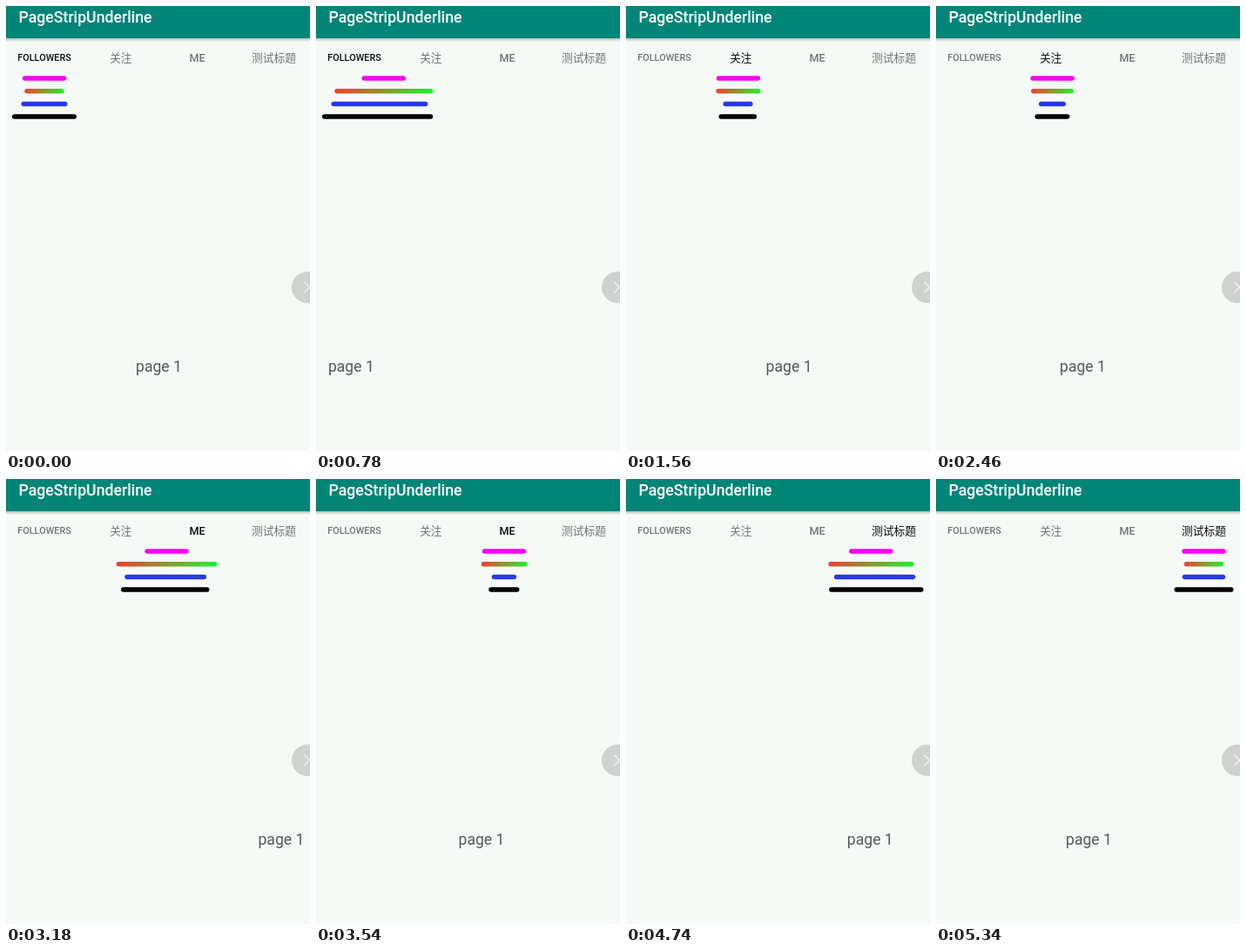
Recreate the animation shown at these times as an HTML page. Size 349 px wide and 511 px high, loop 6000 ms.

```html
<!DOCTYPE html>
<html lang="en">
<head>
<meta charset="utf-8">
<title>Tab underline styles</title>
<style>
  html, body { margin: 0; width: 100%; height: 100%; overflow: hidden; background: #f5faf6; }
  svg { display: block; width: 349px; height: 511px; font-family: Roboto, "Noto Sans CJK SC", "Noto Sans CJK", sans-serif; }
  .title { font-size: 17.7px; font-weight: 500; fill: #fff; }
  .tab { font-weight: 500; fill: #727572; text-anchor: middle; }
  .tab.cjk { font-family: "Noto Sans CJK SC", "Noto Sans CJK", sans-serif; font-weight: 400; }
  .tab.on { fill: #0c0c0c; }
  .page { font-size: 17.6px; fill: #565856; text-anchor: middle; }
</style>
</head>
<body>
<svg viewBox="0 0 349 511">
  <defs>
    <linearGradient id="heat">
      <stop offset="0" stop-color="#f04030"/>
      <stop offset="1" stop-color="#20f030"/>
    </linearGradient>
    <linearGradient id="shade" x2="0" y2="1">
      <stop offset="0" stop-color="#000" stop-opacity=".26"/>
      <stop offset="1" stop-color="#000" stop-opacity="0"/>
    </linearGradient>
  </defs>
  <rect width="349" height="511" fill="#f5faf6"/>
  <rect y="37" width="349" height="4" fill="url(#shade)"/>
  <rect width="349" height="37" fill="#008577"/>
  <text class="title" x="14.5" y="19">PageStripUnderline</text>
  <g id="tabs"></g>
  <g id="bars"></g>
  <g id="pages"></g>
  <circle cx="346" cy="323" r="18" fill="#cfd3cf"/>
  <path d="M342.5 317l12 12m0-12l-12 12" stroke="#f1f4f1" stroke-width="1.3"/>
</svg>
<script>
  const LOOP = 6000, STEP = 60, PAGE_W = 351, TAB_W = 87.83, FIRST = 44;

  const tabs = [
    { label: 'FOLLOWERS', size: 10.9, y: 63 },
    { label: '关注', size: 12.6, y: 63.7, cjk: true },
    { label: 'ME', size: 12.6, y: 63.5 },
    { label: '测试标题', size: 12.75, y: 63.7, cjk: true }
  ];

  // half: half width of the bar under each tab
  const bars = [
    { y: 83, fill: '#f800f0', half: [25.2, 25.2, 25.2, 25.2], rigid: true },
    { y: 97.8, fill: 'url(#heat)', half: [22.7, 22.7, 22.7, 22.7] },
    { y: 112.4, fill: '#2838e8', half: [26.5, 13.8, 10.4, 24.7] },
    { y: 127, fill: '#000', half: [37, 18.3, 13.8, 34] }
  ];

  // [time, pager position]
  const keys = [
    [0, 0], [240, 0], [780, 0.385], [900, 0.52], [1560, 0.967], [1800, 1],
    [2400, 1], [2460, 1.02], [3060, 1.47], [3180, 1.6], [3660, 2],
    [4200, 2], [4260, 2.088], [4500, 2.4], [4860, 2.82], [5100, 2.965], [5340, 3], [LOOP, 3]
  ];

  const clamp = v => Math.min(1, Math.max(0, v));
  const lerp = (a, b, u) => a + (b - a) * u;
  const center = i => FIRST + TAB_W * i;

  const secant = i => (keys[i + 1][1] - keys[i][1]) / (keys[i + 1][0] - keys[i][0]);
  const slopes = keys.map((_, i) => {
    if (i === 0 || i === keys.length - 1) return 0;
    const a = secant(i - 1), b = secant(i);
    return a && b ? 2 * a * b / (a + b) : 0;
  });

  // Monotone cubic through the keys
  function position(t) {
    let i = 0;
    while (i < keys.length - 2 && t >= keys[i + 1][0]) i++;
    const [t0, p0] = keys[i], [t1, p1] = keys[i + 1];
    const h = t1 - t0, u = (t - t0) / h, v = 1 - u;
    return lerp(p0, p1, u * u * (3 - 2 * u)) + h * u * v * (v * slopes[i] - u * slopes[i + 1]);
  }

  function add(parent, tag, attrs, text = '') {
    const el = document.createElementNS('http://www.w3.org/2000/svg', tag);
    for (const k in attrs) el.setAttribute(k, attrs[k]);
    el.textContent = text;
    return document.getElementById(parent).appendChild(el);
  }

  const pages = document.getElementById('pages');
  tabs.forEach((tab, i) => {
    tab.el = add('tabs', 'text', {
      class: tab.cjk ? 'tab cjk' : 'tab', x: center(i), y: tab.y, 'font-size': tab.size
    }, tab.label);
    add('pages', 'text', { class: 'page', x: PAGE_W * (i + 0.5), y: 419.7 }, 'page 1');
  });
  for (const bar of bars) {
    bar.el = add('bars', 'rect', { y: bar.y - 2.75, height: 5.5, rx: 2.75, fill: bar.fill });
  }

  function draw(p) {
    const i = Math.min(2, Math.floor(p)), u = p - i;
    for (const { el, half, rigid } of bars) {
      // The leading edge moves in the first half, the trailing edge in the second
      const tail = rigid ? u : clamp(2 * u - 1), head = rigid ? u : clamp(2 * u);
      const left = lerp(center(i) - half[i], center(i + 1) - half[i + 1], tail);
      const right = lerp(center(i) + half[i], center(i + 1) + half[i + 1], head);
      el.setAttribute('x', left);
      el.setAttribute('width', right - left);
    }
    tabs.forEach((tab, n) => tab.el.classList.toggle('on', n === Math.round(p)));
    pages.setAttribute('transform', `translate(${-p * PAGE_W} 0)`);
  }

  function tick() {
    const t = performance.now() % LOOP;
    draw(position(Math.floor(t / STEP) * STEP));
    requestAnimationFrame(tick);
  }
  tick();
</script>
</body>
</html>
```
